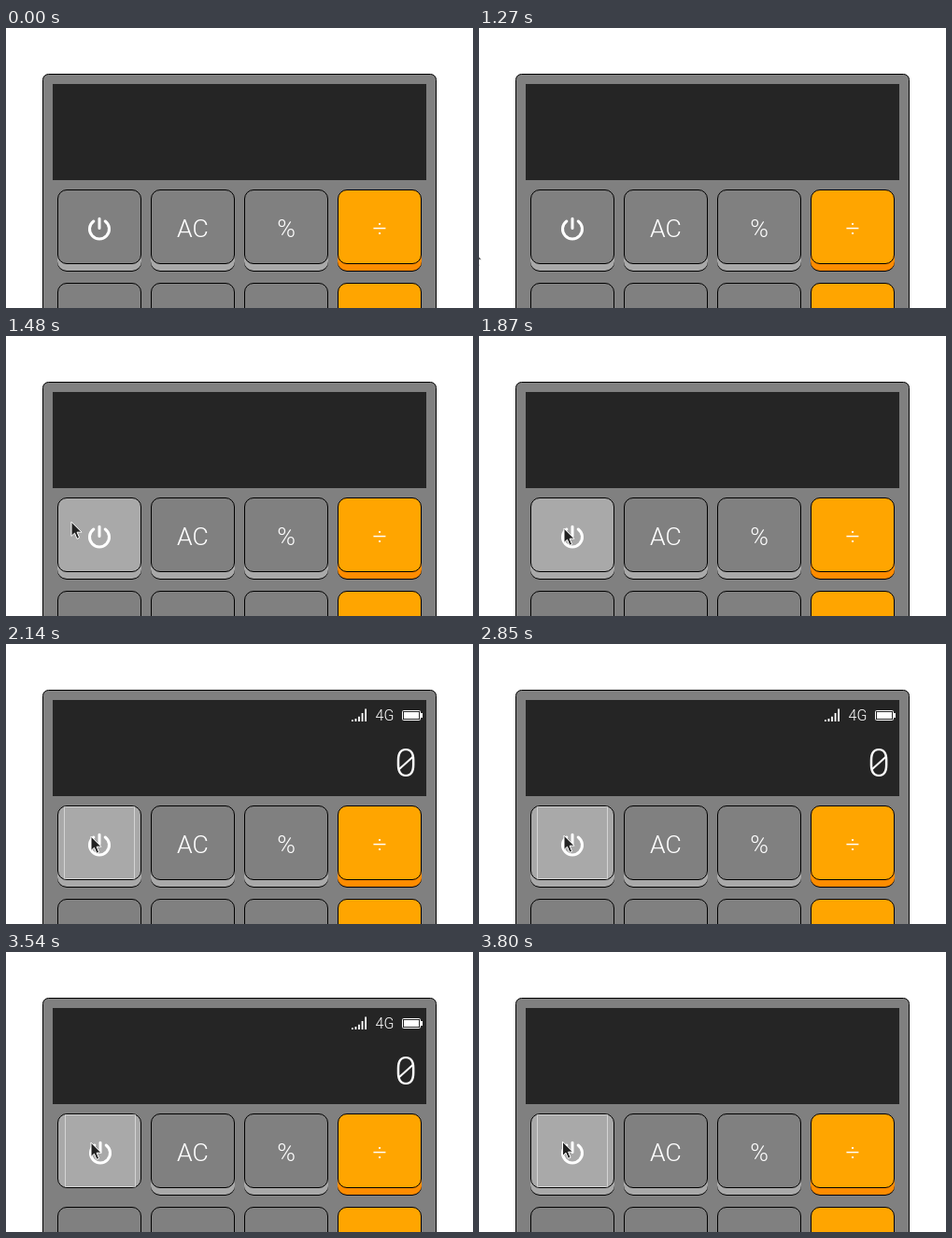
Animation, 500 px wide and 300 px high, one loop 4930 ms. Source, as an HTML page:

```html
<!DOCTYPE html>
<html lang="en">
<head>
<meta charset="utf-8">
<title>Calculator</title>
<style>
html, body { margin: 0; width: 100%; height: 100%; overflow: hidden; background: #fff; }
svg { display: block; width: 500px; height: 300px; }
text { font-family: Roboto, sans-serif; font-weight: 300; fill: #fff; text-anchor: middle; }
.label { font-size: 26.67px; }
</style>
</head>
<body>
<svg viewBox="0 0 500 300">
  <rect x="39.5" y="49.5" width="421" height="300" rx="6" fill="#808080" stroke="#000"/>
  <rect x="50" y="60" width="400" height="103" fill="#252525"/>

  <g id="display" fill="#fff">
    <path d="M370 81.2h1.8v1.8h-1.8zM373.55 80h1.8v3h-1.8zM377.1 77.7h1.8v5.3h-1.8zM380.65 74.1h1.8v8.9h-1.8zM384.2 69.4h1.8v13.6h-1.8z"/>
    <text x="405.5" y="82" font-size="16">4G</text>
    <rect x="424.5" y="71.5" width="19" height="10" rx="1" fill="none" stroke="#fff"/>
    <path d="M426 73h16v7h-16zM444 74h2v5h-2z"/>
    <text x="428" y="142.3" font-size="42.67">0</text>
    <path d="M420.5 134.5L435.5 121" stroke="#fff" stroke-width="2"/>
  </g>

  <g id="keys"></g>

  <g id="face">
    <path d="M93.8 207A10.5 10.5 0 1 0 106.2 207M100 204.3V214.5" fill="none" stroke="#fff" stroke-width="3" stroke-linecap="round"/>
    <rect id="focus" x="62.5" y="174.5" width="75" height="77" fill="none" stroke="#fff" stroke-dasharray="1"/>
  </g>
  <path id="cursor" d="M1 1.2V16.4L4.5 13.2L7 19.3L9.6 18.2L7.1 12.2H12z" fill="#222" stroke="#fff"/>
</svg>
<script>
const LOOP = 4930;
const $ = id => document.getElementById(id);

// [time, x, y] of the pointer; each holds until the next
const moves = [
  [0, -40, 250], [1270, -9, 236], [1310, 11, 226], [1350, 30, 216],
  [1390, 47, 207], [1440, 61, 201], [1480, 69, 198], [1710, 77, 201],
  [1790, 85, 204], [1870, 90, 205], [2850, 90, 204], [3540, 90, 203], [3800, 88.5, 202]
];

function key(x, y, label, fill, shade) {
  const box = (dy, color) =>
    `<rect x="${x}" y="${y + dy}" width="90" height="80" rx="10" fill="${color}"/>`;
  return `<g><g class="shadow">${box(8, '#000')}${box(7, shade)}</g>
    <rect class="cap" x="${x + .5}" y="${y + .5}" width="89" height="79" rx="9.5" fill="${fill}" stroke="#000"/>
    <text class="label" x="${x + 45}" y="${y + 51}">${label}</text></g>`;
}

$('keys').innerHTML = [173, 273].map(y =>
  ['', 'AC', '%', '÷'].map((label, i) =>
    key(55 + i * 100, y, y < 200 ? label : '',
      i < 3 ? '#808080' : '#ffa500', i < 3 ? '#a9a9a9' : '#ff8c00')
  ).join('')).join('');

const shadow = document.querySelector('.shadow');
const cap = document.querySelector('.cap');
const show = (el, on) => el.setAttribute('visibility', on ? 'visible' : 'hidden');

function draw(now) {
  const t = now % LOOP;
  const [, x, y] = moves.filter(m => m[0] <= t).pop();
  const pressed = t >= 3500 && t < 3650;
  $('cursor').setAttribute('transform', `translate(${x} ${y})`);
  cap.setAttribute('fill', x >= 55 ? '#a9a9a9' : '#808080');
  $('face').setAttribute('transform', `translate(${pressed ? 1 : 0} 0)`);
  show(shadow, !pressed);
  show($('focus'), t >= 2140);
  show($('display'), t >= 2140 && t < 3650);
}

let start;
function tick() {
  const now = performance.now();
  start ??= now;
  draw(now - start);
  requestAnimationFrame(tick);
}
tick();
</script>
</body>
</html>
```
